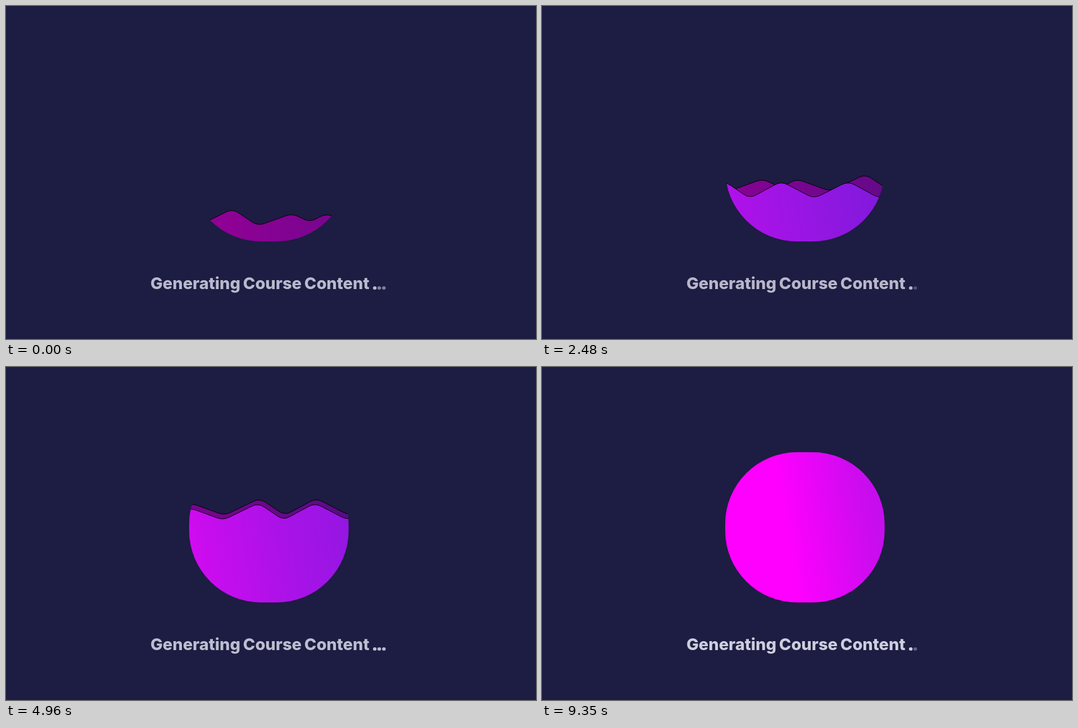
Animation, 943 px wide and 594 px high, one loop 9430 ms. Source, as an HTML page with a canvas:

```html
<!DOCTYPE html>
<html lang="en">
<head>
<meta charset="utf-8">
<title>Generating Course Content</title>
<style>
  html, body { margin: 0; height: 100%; overflow: hidden; background: #1d1c42; }
  canvas { display: block; }
</style>
</head>
<body>
<canvas width="943" height="594"></canvas>
<script>
const ctx = document.querySelector('canvas').getContext('2d');
const LOOP = 9.43;

// Wave outline corners, shared by both layers
const HIGH = 383, LOW = 413.5;
const corners = [
  [-208, HIGH], [-148, LOW], [-87.5, HIGH], [-42.5, LOW], [18.5, 391.5], [50.5, 407],
  [78.5, 391.5], [138.5, LOW], [201, HIGH], [245.5, LOW], [301.5, HIGH], [360, LOW],
  [421, HIGH], [477, LOW], [537, HIGH], [595, LOW], [655, HIGH], [715, LOW]
];

function gradient(x0, x1, colors) {
  const g = ctx.createLinearGradient(x0, 490, x1, 490 - 0.17 * (x1 - x0));
  colors.forEach((c, i) => g.addColorStop(i / (colors.length - 1), c));
  return g;
}
const frontFill = gradient(-45, 520, ['#ff00ff', '#cc0cee', '#ab12e8', '#9117e1', '#7a1ad8']);
const backFill = gradient(-118, 431, ['#920096', '#4e0e82']);

// Point at horizontal distance d from a, on the way to b
function along(a, b, d) {
  const k = d / Math.abs(b[0] - a[0]);
  return [a[0] + (b[0] - a[0]) * k, a[1] + (b[1] - a[1]) * k];
}

const wave = new Path2D();
wave.moveTo(-208, 1000);
wave.lineTo(...corners[0]);
for (let i = 1; i < corners.length - 1; i++) {
  const p = corners[i];
  wave.lineTo(...along(p, corners[i - 1], 11));
  wave.quadraticCurveTo(...p, ...along(p, corners[i + 1], 11));
}
wave.lineTo(...corners[corners.length - 1]);
wave.lineTo(715, 1000);
wave.closePath();

const vessel = new Path2D();
vessel.roundRect(326, 152, 283.5, 268, 128);

function drawWave(x, y, fill) {
  ctx.save();
  ctx.translate(x, y);
  ctx.fillStyle = fill;
  ctx.fill(wave);
  ctx.strokeStyle = '#000';
  ctx.lineWidth = 1;
  ctx.stroke(wave);
  ctx.restore();
}

// Linear interpolation through [position, value] keys
function keyed(p, keys) {
  let [a, b] = keys;
  for (let i = 1; i < keys.length && p > a[0]; i++) {
    b = keys[i];
    if (p <= b[0]) return a[1] + (b[1] - a[1]) * (p - a[0]) / (b[0] - a[0]);
    a = b;
  }
  return a[1];
}
const fadeOut = [[0, 1], [0.06, 1], [0.11, 0.28], [0.32, 0.06], [0.42, 0]];
const secondDot = [...fadeOut, [0.46, 0], [0.64, 1]];
const thirdDot = [...fadeOut, [0.58, 0], [0.88, 1]];

function drawCaption(t) {
  const pulse = 0.82 + 0.1 * Math.cos((t - 0.57) / 1.3 * 2 * Math.PI);
  const phase = (t < 0.08 ? 0.085 : t) % 0.98;
  ctx.fillStyle = '#f2f4ff';
  ctx.globalAlpha = pulse;
  ctx.textAlign = 'left';
  ctx.font = '800 29px Inter, sans-serif';
  ctx.wordSpacing = '-1.5px';
  ctx.fillText('Generating Course Content', 257, 505);
  ctx.textAlign = 'center';
  ctx.font = '800 32px "Open Sans", sans-serif';
  [1, keyed(phase, secondDot), keyed(phase, thirdDot)].forEach((alpha, i) => {
    ctx.globalAlpha = pulse * alpha;
    ctx.fillText('.', 656 + i * 8.2, 505.5);
  });
  ctx.globalAlpha = 1;
}

function draw(now) {
  const t = now / 1000 % LOOP;
  const backTime = t + 0.16 * Math.max(0, 1 - t);
  ctx.fillStyle = '#1d1c42';
  ctx.fillRect(0, 0, 943, 594);
  ctx.save();
  ctx.clip(vessel);
  drawWave(498.5 - 50 * backTime, -17 - 26.57 * backTime, backFill);
  if (t >= 0.08) drawWave(50 * t, -28.28 * t, frontFill);
  ctx.restore();
  drawCaption(t);
}

const start = performance.now();
function tick() {
  draw(performance.now() - start);
  requestAnimationFrame(tick);
}
tick();
</script>
</body>
</html>
```
